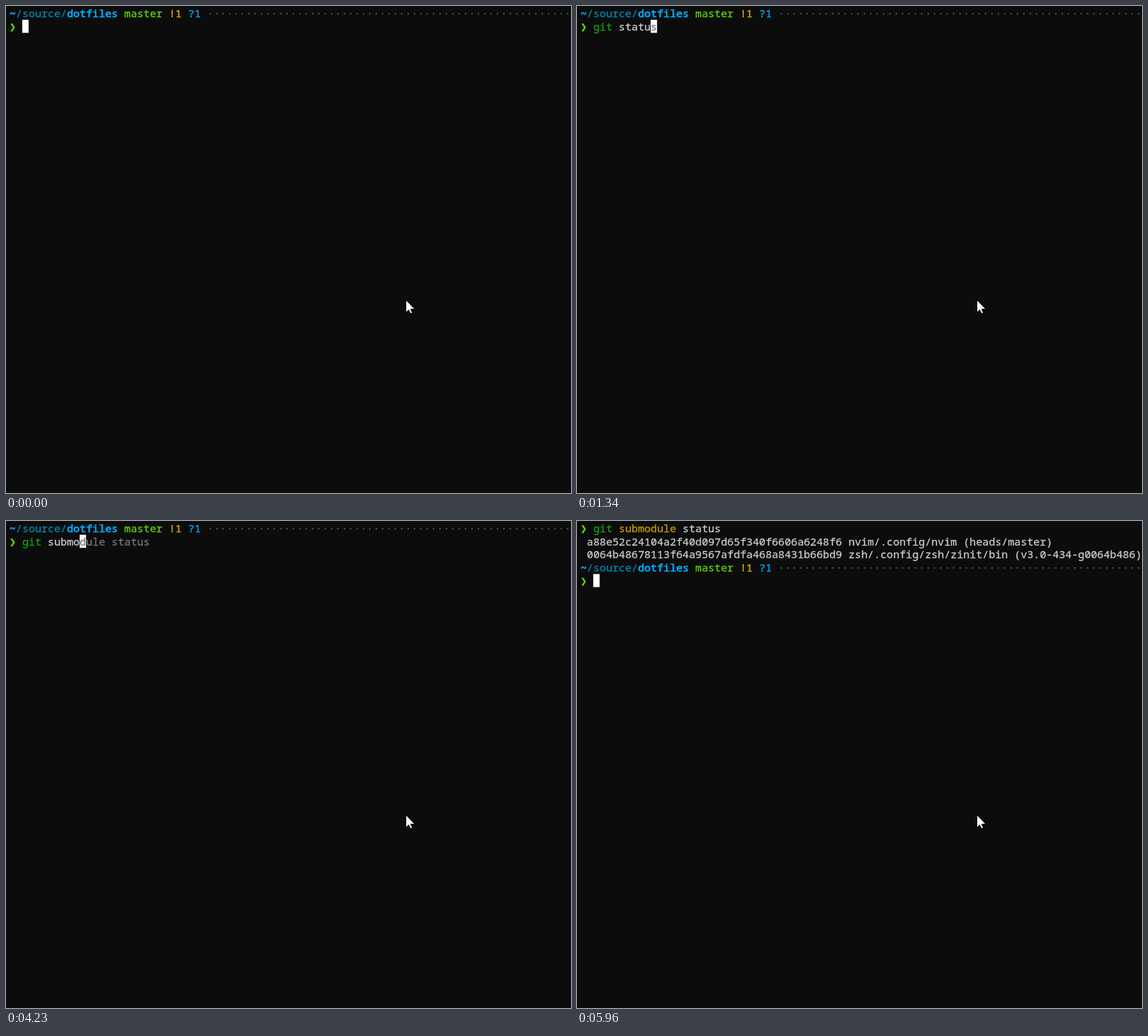
An HTML page with a canvas that plays this animation: 806x695 px, repeating every 8 s.

```html
<!DOCTYPE html>
<html lang="en">
<head>
<meta charset="utf-8">
<title>Terminal: git submodule status</title>
<style>
  html, body { margin: 0; width: 100%; height: 100%; overflow: hidden; background: #0c0c0c; }
  canvas { display: block; }
</style>
</head>
<body>
<canvas id="stage" width="806" height="695"></canvas>
<script>
const ctx = document.getElementById("stage").getContext("2d");

const LOOP = 8000;
const CELL = { left: 5, top: 1, width: 9.1, height: 18.67, baseline: 15 };
const FONT = '15.17px "Noto Sans Mono", "DejaVu Sans Mono", monospace';
const COLOR = {
  back: "#0c0c0c", text: "#cccccc", hint: "#767676", cursor: "#ffffff",
  path: "#0087af", folder: "#00afff", branch: "#5fd700", changed: "#d7af00",
  dots: "#585858", command: "#13a10e", subcommand: "#c19c00", unknown: "#c50f1f"
};

// Each step: start time, typed text, suggested remainder.
const typing = [
  [0, "", ""],
  [90, "g", "it status"],
  [160, "gi", "t status"],
  [320, "git", " status"],
  [470, "git ", "status"],
  [700, "git s", "tatus"],
  [860, "git st", "atus"],
  [940, "git sta", "tus"],
  [1110, "git stat", "us"],
  [1340, "git statu", "s"],
  [2270, "git ", "status"],
  [3290, "git s", "tatus"],
  [3370, "git su", "bmodule status"],
  [3680, "git sub", "module status"],
  [4060, "git subm", "odule status"],
  [4230, "git submo", "dule status"],
  [5430, "git submodule status", ""]
];
const SUBMIT = 5820, FIRST_OUTPUT = 5890, DONE = 5960;

const output = [
  " a88e52c24104a2f40d097d65f340f6606a6248f6 nvim/.config/nvim (heads/master)",
  " 0064b48678113f64a9567afdfa468a8431b66bd9 zsh/.config/zsh/zinit/bin (v3.0-434-g0064b486)"
];

const cellX = col => CELL.left + col * CELL.width;
const cellY = row => CELL.top + row * CELL.height;

// Writes on the character grid and returns the next free column.
// A thin outline in the text colour sets the weight.
function write(row, col, text, color, bold = false) {
  ctx.font = FONT;
  ctx.fillStyle = ctx.strokeStyle = color;
  ctx.lineWidth = bold ? 0.7 : 0.3;
  ctx.lineJoin = "round";
  for (const char of text) {
    const x = cellX(col++), y = Math.round(cellY(row) + CELL.baseline);
    ctx.fillText(char, x, y);
    ctx.strokeText(char, x, y);
  }
  return col;
}

function drawCursor(row, col) {
  ctx.fillStyle = COLOR.cursor;
  ctx.fillRect(cellX(col), cellY(row), CELL.width, CELL.height);
}

function drawStatusLine(row) {
  let col = write(row, 0, "~", COLOR.folder, true);
  col = write(row, col, "/source/", COLOR.path);
  col = write(row, col, "dotfiles ", COLOR.folder, true);
  col = write(row, col, "master ", COLOR.branch);
  col = write(row, col, "!1 ", COLOR.changed);
  col = write(row, col, "?1 ", COLOR.folder);
  write(row, col, "·".repeat(88 - col), COLOR.dots);
}

function drawPrompt(row, typed, hint, showCursor = true) {
  write(row, 0, "❯", COLOR.branch);
  const [command, ...args] = typed.split(" ");
  const known = command === "git";
  let col = write(row, 2, command, known ? COLOR.command : COLOR.unknown, !known);
  for (const arg of args) {
    col = write(row, col + 1, arg, arg === "submodule" ? COLOR.subcommand : COLOR.text);
  }
  if (showCursor) drawCursor(row, col);
  write(row, col, hint, COLOR.hint);
}

function drawPointer() {
  ctx.fillStyle = "#ffffff";
  ctx.strokeStyle = "#000000";
  ctx.lineWidth = 1;
  ctx.lineJoin = "miter";
  const arrow = new Path2D("M570.5 419.5V437.5l4-3.7 2.4 5.3 2.9-1.2-2.4-5.2H583.3Z");
  ctx.fill(arrow);
  ctx.stroke(arrow);
}

function draw(time) {
  ctx.fillStyle = COLOR.back;
  ctx.fillRect(0, 0, 806, 695);

  const [, typed, hint] = typing.findLast(([start]) => time >= start);
  if (time < SUBMIT) {
    drawStatusLine(0);
    drawPrompt(1, typed, hint);
  } else {
    drawPrompt(0, typed, "", time < FIRST_OUTPUT);
    if (time >= FIRST_OUTPUT) write(1, 0, output[0], COLOR.text);
    if (time >= DONE) {
      write(2, 0, output[1], COLOR.text);
      drawStatusLine(3);
      drawPrompt(4, "", "");
    } else if (time >= FIRST_OUTPUT) {
      drawCursor(2, 0);
    }
  }
  drawPointer();
}

const startTime = performance.now();
function tick() {
  draw((performance.now() - startTime) % LOOP);
  requestAnimationFrame(tick);
}
tick();
</script>
</body>
</html>
```
